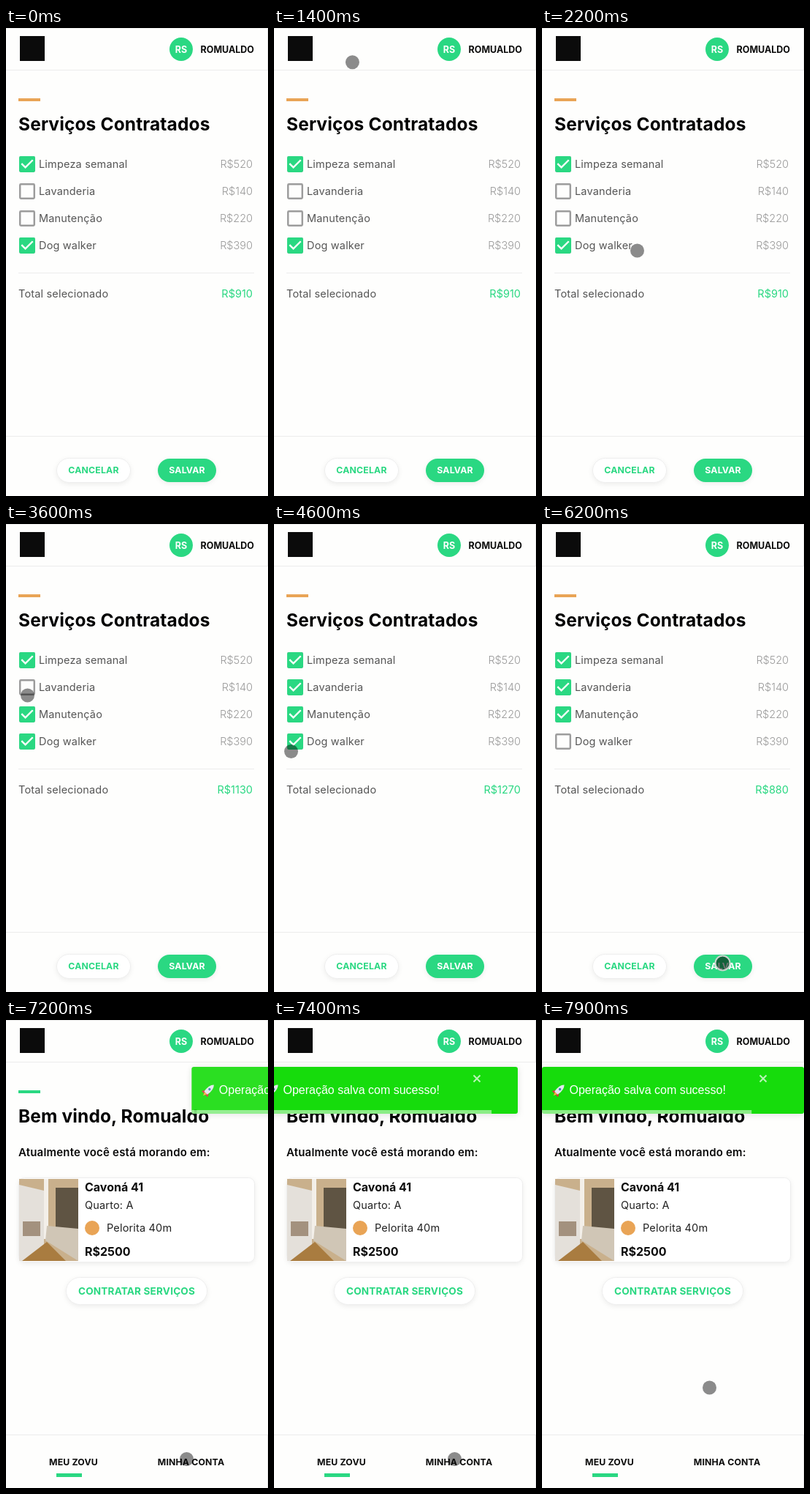
An HTML page for the animation above (8000 ms loop, 359x639 px).

```html
<!DOCTYPE html>
<html lang="pt-BR">
<head>
<meta charset="utf-8">
<title>Serviços contratados</title>
<style>
  html, body { margin: 0; width: 100%; height: 100%; overflow: hidden; background: #fefefd; }
  svg { display: block; width: 100%; height: 100%; }
  text { font-family: Inter, sans-serif; white-space: pre; }
  .toast { font-family: "Liberation Sans", Arial, sans-serif; }
  .pill { filter: drop-shadow(0 2px 3px rgba(0, 0, 0, .07)); }
</style>
</head>
<body>
<svg id="stage" viewBox="0 0 359 639"></svg>
<script>
const GREEN = '#2ad882', ORANGE = '#e9a456', LINE = '#ececec', DARK = '#0b0b0b', GREY = '#555';
const LOOP = 8000, STEP = 100;
const SAVE_PRESS = 6200, HOME = 6800, LOADED = 6900, TOAST_IN = 6953.4;
const $ = id => document.getElementById(id);

const rect = (x, y, w, h, fill, extra = '') =>
  `<rect x="${x}" y="${y}" width="${w}" height="${h}" fill="${fill}" ${extra}/>`;
const circle = (x, y, r, fill, extra = '') => `<circle cx="${x}" cy="${y}" r="${r}" fill="${fill}" ${extra}/>`;
const shape = (d, fill) => `<path d="${d}" fill="${fill}"/>`;
const text = (x, y, s, size, weight, fill, spacing = 0, extra = '') =>
  `<text x="${x}" y="${y}" font-size="${size}" font-weight="${weight}" fill="${fill}" letter-spacing="${spacing}em" ${extra}>${s}</text>`;
const end = 'text-anchor="end"', middle = 'text-anchor="middle"';

const body = (x, y, s, fill = GREY) => text(x, y, s, 14.5, 400, fill, .012);
const price = (y, s, weight, fill, extra = '') => text(338, y, s, 14.5, weight, fill, 0, end + extra);
const caps = (x, y, s, fill = DARK, size = 12.3) => text(x, y, s, size, 700, fill, .012, middle);
const title = s => text(17, 140, s, 24.5, 700, '#000', .005);
const accent = color => rect(17, 96, 30, 4, color);
const card = (x, y, w, h, r) => rect(x + .5, y + .5, w - 1, h - 1, '#fff', `rx="${r}" stroke="#eee" class="pill"`);

// A service toggles once, at the given time
const services = [
  { label: 'Limpeza semanal', cost: 520, on: true },
  { label: 'Lavanderia', cost: 140, on: false, toggle: 4000 },
  { label: 'Manutenção', cost: 220, on: false, toggle: 3300 },
  { label: 'Dog walker', cost: 390, on: true, toggle: 4900 }
];

const serviceRow = ({ label, cost }, i) => {
  const y = 186 + 37 * i;
  return `<g transform="translate(14.33 ${y - 14.67}) scale(1.222)">
      ${rect(4, 4, 16, 16, 'none', 'rx="1" stroke="#9c9c9c" stroke-width="2"')}
      <g id="tick${i}">${rect(3, 3, 18, 18, GREEN, 'rx="2"')}
        <path d="M5.7 11.3L10 15.6 18.3 7.3" fill="none" stroke="#fff" stroke-width="2"/></g>
    </g>` + body(45, y + 5, label) + price(y + 5, 'R$' + cost, 300, '#999');
};

const header = rect(-1, .5, 359.5, 57, 'none', `stroke="${LINE}"`)
  + rect(19, 11, 34, 34, DARK)
  + circle(240, 29, 16, GREEN)
  + text(240, 33.5, 'RS', 12.5, 700, '#fff', 0, middle)
  + text(340, 34, 'ROMUALDO', 12.5, 700, DARK, 0, end);

const servicesPage = accent(ORANGE) + title('Serviços Contratados')
  + services.map(serviceRow).join('')
  + rect(17, 334, 323, 1, LINE)
  + body(17, 368, 'Total selecionado')
  + price(368, '', 400, GREEN, ' id="total"')
  + rect(0, 557, 359, 1, LINE)
  + card(69, 587, 102, 34, 17) + caps(120, 608, 'CANCELAR', GREEN)
  + rect(208, 588, 80, 32, GREEN, 'rx="16" class="pill"') + caps(248, 608, 'SALVAR', '#fff');

// Living room in flat tones: ceiling, wall, kitchen, pillar, floor, rug, sofa
const photo = '<g id="photo" transform="translate(18 217)">'
  + rect(0, 0, 81, 112, '#c9b08c')
  + shape('M0 8L34 16V112H0z', '#e4e0da')
  + rect(50, 12, 31, 56, '#5f5443')
  + rect(34, 0, 6, 82, '#f3efe9')
  + rect(5, 58, 24, 20, '#a3917e')
  + shape('M4 112L38 86 64 112z', '#a97c40')
  + shape('M38 64L81 68V112L36 84z', '#d0c6b6')
  + '</g>';

const homePage = accent(GREEN) + title('Bem vindo, Romualdo')
  + text(17, 186, 'Atualmente você está morando em:', 15, 600, DARK, .013)
  + card(17, 215, 324, 116, 8) + photo
  + text(108, 234, 'Cavoná 41', 16, 700, DARK)
  + body(108, 258, 'Quarto: A', '#222')
  + circle(118, 284, 10, ORANGE)
  + body(138, 289, 'Pelorita 40m', '#222')
  + text(108, 322, 'R$2500', 16, 700, DARK)
  + card(82, 351, 194, 38, 19) + caps(179, 375, 'CONTRATAR SERVIÇOS', GREEN, 13.6)
  + rect(-1, 566.5, 359.5, 80, 'none', `stroke="${LINE}"`)
  + caps(92.5, 608, 'MEU ZOVU') + caps(253.5, 608, 'MINHA CONTA')
  + rect(69, 619, 35, 5, GREEN);

const rocket = '<g transform="translate(23.5 95.5) rotate(45)">'
  + shape('M-3 3L-6 8H6L3 3z', '#d2383c')
  + shape('M-2 6L0 11 2 6z', '#f6b53c')
  + shape('M0-10Q5-5 3 6H-3Q-5-5 0-10z', '#e3e8ee')
  + circle(0, -1.5, 1.7, '#3f87b5') + '</g>';

const toast = rect(0, 64, 359, 64, '#16dc0c', 'rx="3" style="filter:drop-shadow(0 1px 5px rgba(0,0,0,.12))"')
  + rect(0, 123, 359, 5, '#fff', 'opacity=".5" id="progress"')
  + rocket
  + text(37.5, 101, 'Operação salva com sucesso!', 16, 400, '#fff', 0, 'class="toast"')
  + '<path d="M298.5 75.5l9 9m0-9l-9 9" stroke="#fff" stroke-width="2" opacity=".7"/>';

$('stage').innerHTML = header
  + `<g id="services">${servicesPage}</g><g id="home">${homePage}</g><g id="toast">${toast}</g>`
  + `<g id="cursor">${circle(0, 0, 9.5, '#000', 'id="dot"')}
     ${circle(0, 0, 10, 'none', 'id="ring" stroke="#c9d2cc" stroke-width="2"')}</g>`;

// Places the pointer reaches: arrival time, x, y
const stops = [
  [1300, 96, 15], [1800, 206, 320], [2000, 232, 398], [2200, 130.5, 304], [2900, 38, 258], [3600, 29.5, 234],
  [4200, 29, 278], [4600, 23.5, 310.5], [4800, 23.5, 300], [5300, 25.5, 327], [6100, 247.5, 599.5], [7800, 229.5, 502]
];

// It rests at each stop, then leaves just in time: longer ways take longer
function pointer(t) {
  const i = stops.findIndex(s => s[0] > t);
  if (i < 0) return stops.at(-1).slice(1);
  const [t0, x0, y0] = stops[i - 1], [t1, x1, y1] = stops[i];
  const travel = Math.min(t1 - t0, 35 * Math.sqrt(Math.hypot(x1 - x0, y1 - y0)));
  const p = Math.max(0, 1 - (t1 - t) / travel), k = p * p * (3 - 2 * p);
  return [x0 + (x1 - x0) * k, y0 + (y1 - y0) * k];
}

const isPressed = t => t >= SAVE_PRESS && t < HOME
  || services.some(s => t >= s.toggle - 100 && t < s.toggle);

// Rush in from the right past the edge, then a damped swing
function bounce(p) {
  if (p < .6) return 3025 * (1 - p / .6) ** 3 - 25;
  const swing = (p - .6) / .15;
  return p < 1 ? -25 * Math.cos(Math.PI * swing) * .42 ** swing : 0;
}

const show = (id, on) => $(id).setAttribute('visibility', on ? 'inherit' : 'hidden');

function render(t) {
  let total = 0;
  services.forEach(({ cost, on, toggle }, i) => {
    const ticked = on !== (t >= toggle);
    show('tick' + i, ticked);
    if (ticked) total += cost;
  });
  $('total').textContent = 'R$' + total;

  show('services', t < HOME);
  show('home', t >= HOME);
  show('photo', t >= LOADED);

  const p = (t - TOAST_IN) / 750;
  show('toast', p >= 0);
  if (p >= 0) {
    $('toast').setAttribute('transform', `translate(${bounce(p)} 0)`);
    $('toast').setAttribute('opacity', 1 - Math.max(0, 1 - p / .6) ** 3);
    $('progress').setAttribute('width', 359 * (1 - (t - LOADED) / 5000));
  }

  const visible = t >= stops[0][0], pressed = isPressed(t);
  show('cursor', visible);
  show('ring', visible && pressed);
  $('dot').setAttribute('opacity', pressed ? .55 : .45);
  if (visible) $('cursor').setAttribute('transform', `translate(${pointer(t)})`);
}

// The screen advances ten times a second
function tick() {
  render(Math.floor(performance.now() % LOOP / STEP) * STEP);
  requestAnimationFrame(tick);
}
tick();
</script>
</body>
</html>
```
